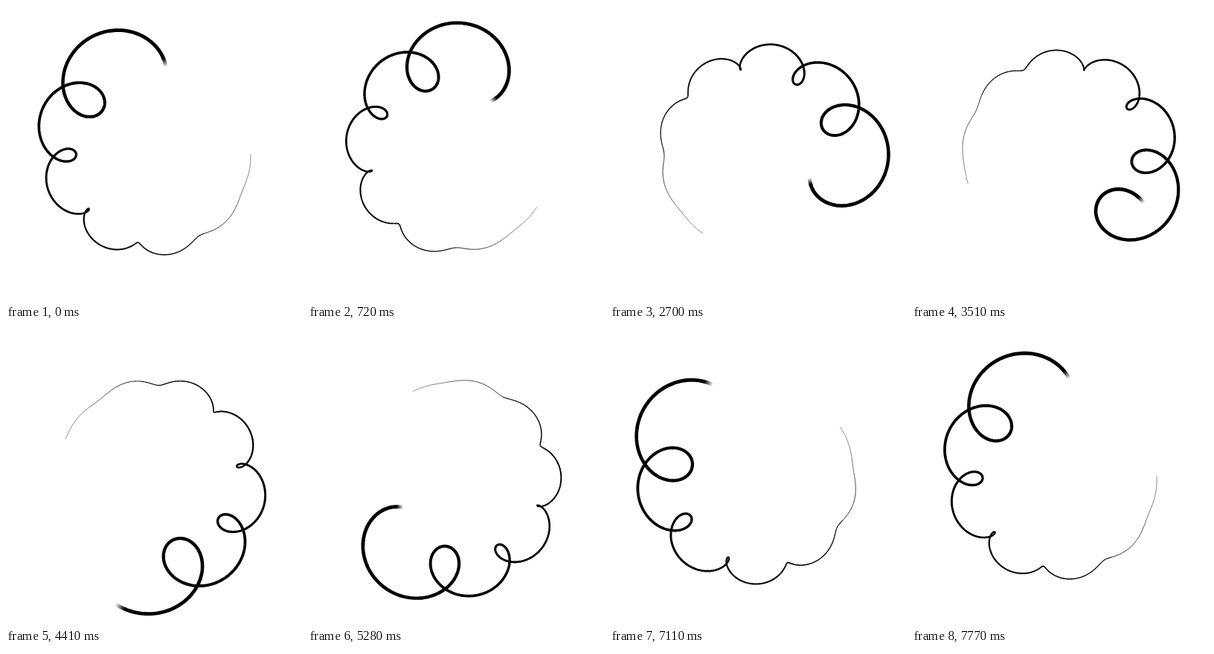
Animation, 398 px wide and 398 px high, one loop 7800 ms. Source, as an HTML page with a canvas:

```html
<!DOCTYPE html>
<html lang="en">
<head>
<meta charset="utf-8">
<title>Curling line</title>
<style>
  html, body { margin: 0; width: 100%; height: 100%; overflow: hidden; background: #fff; }
  canvas { display: block; width: 398px; height: 398px; }
</style>
</head>
<body>
<canvas id="stage" width="398" height="398"></canvas>
<script>
  const ctx = document.getElementById('stage').getContext('2d');
  const LOOP = 7800, TICK = 30;
  const CENTER = 199, RADIUS = 130;
  const SPAN = 252;             // degrees from tail to head
  const FADE = [251.5, 252.7];  // soft tip of the head
  const CHUNK = 3, STEP = 0.25;
  const RAD = Math.PI / 180;

  // The curls grow exponentially from tail to head.
  const curlSize = s => 6.07 * (10 ** (s / SPAN) - 1);
  const lineWidth = s => 0.45 + 4.5 * (s / SPAN) ** 1.4;

  // Point of the curve, s degrees ahead of the tail, with the tail at angle turn.
  function point(s, turn) {
    const curl = curlSize(s);
    const a = (turn + s) * RAD;
    const b = 10 * a + 3 * turn * RAD;
    return [
      CENTER + RADIUS * Math.cos(a) + curl * Math.cos(b),
      CENTER + RADIUS * Math.sin(a) + curl * Math.sin(b)
    ];
  }

  function strokePart(from, to, turn, style) {
    const steps = Math.ceil((to - from) / STEP);
    ctx.beginPath();
    for (let i = 0; i <= steps; i++) {
      ctx.lineTo(...point(from + (to - from) * i / steps, turn));
    }
    ctx.lineWidth = lineWidth((from + to) / 2);
    ctx.strokeStyle = style;
    ctx.stroke();
  }

  function draw(time) {
    const turn = 360 * time / LOOP;
    const [fadeStart, fadeEnd] = FADE;
    ctx.clearRect(0, 0, 398, 398);
    ctx.lineJoin = 'round';

    // Neighbouring parts overlap a little so no seam shows.
    for (let s = 0; s < fadeStart; s += CHUNK) {
      strokePart(s, Math.min(s + CHUNK + 0.1, fadeStart), turn, '#000');
    }

    const tip = ctx.createLinearGradient(...point(fadeStart, turn), ...point(fadeEnd, turn));
    tip.addColorStop(0, 'rgba(0,0,0,1)');
    tip.addColorStop(1, 'rgba(0,0,0,0)');
    strokePart(fadeStart - 0.1, fadeEnd, turn, tip);
  }

  const start = performance.now();
  function frame() {
    const time = (performance.now() - start) % LOOP;
    draw(Math.floor(time / TICK) * TICK);
    requestAnimationFrame(frame);
  }
  frame();
</script>
</body>
</html>
```
